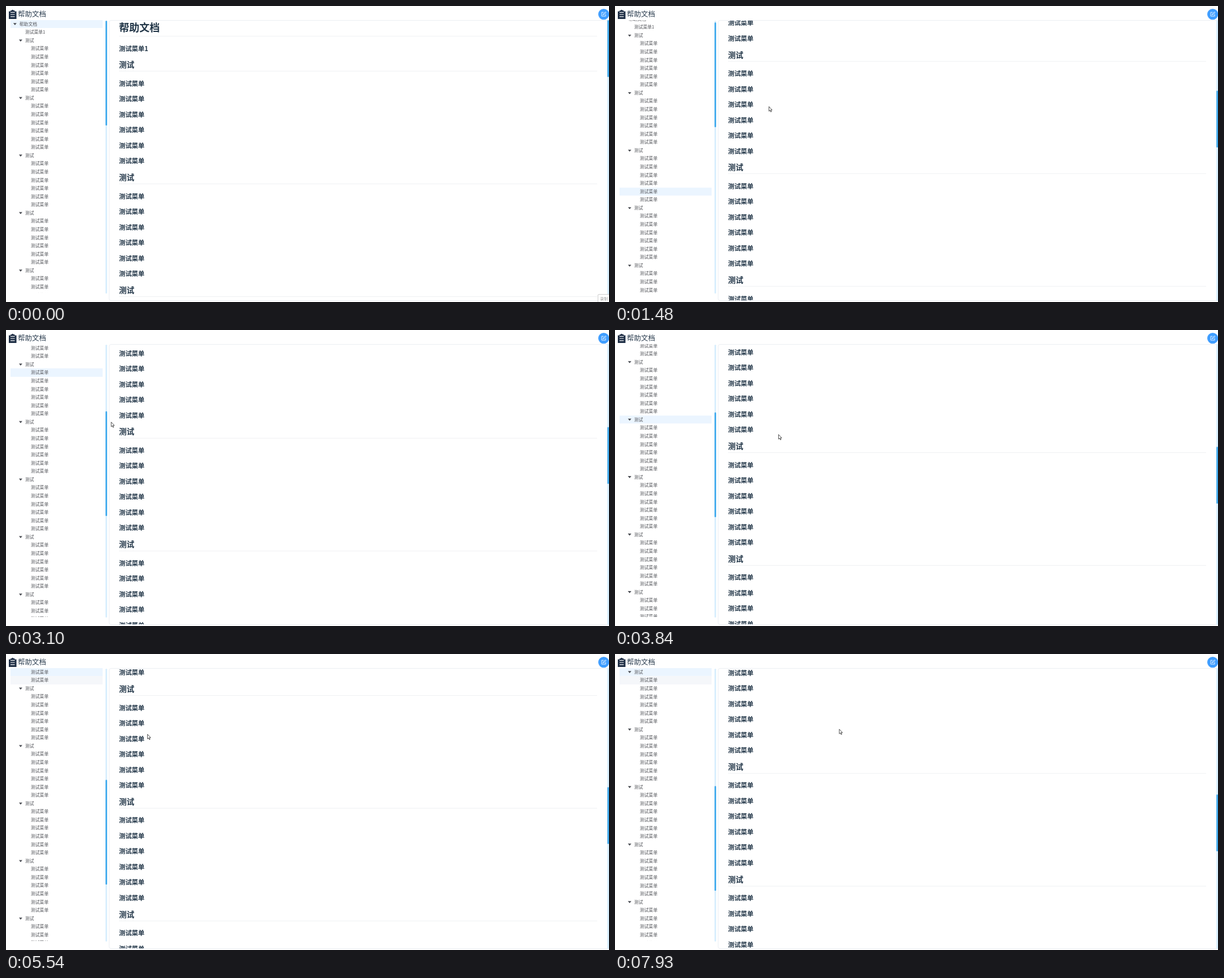
These frames come from a looping animation (1067 by 525 pixels, 8 s). An HTML page:

```html
<!DOCTYPE html>
<html>
<head>
<meta charset="utf-8">
<title>帮助文档</title>
<style>
  html, body { margin: 0; width: 1067px; height: 525px; overflow: hidden; background: #fff; }
  body { position: relative; font-family: "Noto Sans CJK SC", "Noto Sans CJK", "Noto Sans", sans-serif; }
  div, span, svg { position: absolute; white-space: nowrap; box-sizing: border-box; }
  .title { left: 21px; top: 4px; font-size: 12.5px; line-height: 20px; color: #2c3e50; }

  .tree { left: 0; top: 25px; width: 176px; height: 484px; overflow: hidden; }
  .row { left: 8px; width: 163px; height: 14.57px; line-height: 13.7px; font-size: 7.8px; color: #505257; }
  .row.focus { background: #f5f7fa; }
  .row.active { background: #ebf5ff; }
  .row i { position: absolute; top: 5.6px; width: 6px; height: 3.8px; background: #4b4e54;
           clip-path: polygon(0 0, 100% 0, 50% 100%); }

  .panel { left: 182px; top: 25px; width: 888px; height: 498px; border: 1px solid #ebeef3; border-radius: 4px; }
  .doc { left: 182px; top: 26px; width: 880px; height: 496px; overflow: hidden; }
  .head { left: 18px; width: 846px; height: 24px; line-height: 24px; font-weight: 700; color: #213547; }
  .h1 { font-size: 18px; margin-top: -1px; }
  .h2 { font-size: 13.5px; margin-top: -.6px; }
  .h3 { font-size: 11.25px; margin-top: -.5px; }
  .rule { left: 18px; width: 846px; height: 1px; background: #eff1f3; }

  .track { width: 3px; background: #d9effd; border-radius: 2px; }
  .thumb { left: 0; top: 0; width: 3px; background: #49aeee; border-radius: 2px; }
  .tag { left: 1047px; top: 511px; width: 24px; height: 18px; border: 1px solid #ccc; border-radius: 2px;
         background: #fff; font-size: 7px; line-height: 14px; padding-left: 3px; color: #999; }
  .ring { width: 13px; height: 13px; margin: -6.5px; border-radius: 50%; background: #fdf63c; opacity: .8; }
  #cursor { left: 0; top: 0; width: 16px; height: 16px; overflow: visible; }
</style>
</head>
<body>
<svg width="24" height="25" style="left:0;top:0">
  <path fill="#1f2f46" d="M5 9.5H8V8H10Q10.3 6.8 11.8 6.8T13.6 8H15.5V9.5H18.5V23H5Z"/>
  <path stroke="#fff" stroke-width="1.2" d="M8 11.3H15.5M8 15H15.5M8 18.8H15.5"/>
</svg>
<div class="title">帮助文档</div>
<svg width="20" height="25" style="left:1047px;top:0">
  <circle cx="10.6" cy="14.6" r="9.6" fill="#409eff"/>
  <path fill="none" stroke="#fff" stroke-width=".9" d="M10.5 11.2H7.2V18H14V14.6M9.6 15.6L10 14L13.6 10.4L14.8 11.6L11.2 15.2Z"/>
</svg>

<div class="tree"><div id="rows"></div></div>
<div class="track" style="left:176px;top:26px;height:484px"><div class="thumb" id="treeThumb" style="height:186px"></div></div>
<div class="panel"></div>
<div class="doc"><div id="heads"></div></div>
<div class="track" style="left:1064px;top:25px;height:498px"><div class="thumb" id="docThumb" style="height:101px"></div></div>
<div class="tag" id="tag">录制</div>
<div class="ring" id="ring"></div>
<svg id="cursor">
  <path id="arrow" fill="#fff" stroke="#222" stroke-width=".8" d="M.4 .4V8.6L2.3 6.9L3.6 9.9L4.9 9.3L3.6 6.4H6Z"/>
  <path id="beam" fill="none" stroke="#333" stroke-width=".8" d="M-2.2 -4.5H2.2M0 -4.5V4.5M-2.2 4.5H2.2"/>
  <path id="hand" fill="#fff" stroke="#222" stroke-width=".8" stroke-linejoin="round"
    d="M-1 1Q0 -.4 1 1V4.2Q2 3.6 2.7 4.6Q3.7 4.1 4.3 5Q5.4 4.8 5.5 6V8.5Q5.3 10 4.6 11.6H-.6Q-1.8 9.6 -3.4 7.4Q-3.6 5.8 -2 6.4L-1 7.4Z"/>
</svg>

<script>
const $ = id => document.getElementById(id);
const LOOP = 8000, ROW = 14.57, GROUP = 199.75, GROUPS = 12;

// Headings: y is the centre on the stage before scrolling.
const heads = [
  { level: 1, text: '帮助文档', y: 38 },
  { level: 3, text: '测试菜单1', y: 75, depth: 1 }
];
for (let g = 0; g < GROUPS; g++) {
  const y = 104 + g * GROUP;
  heads.push({ level: 2, text: '测试', y });
  for (let i = 0; i < 6; i++) heads.push({ level: 3, text: '测试菜单', y: y + 33.4 + i * 27.5 });
}
const rowOf = (g, i = -1) => 3 + g * 7 + i;
const scrollOf = row => row * ROW;

function add(parent, cls, top, text = '') {
  const el = document.createElement('div');
  el.className = cls;
  el.style.top = top + 'px';
  el.textContent = text;
  parent.append(el);
  return el;
}

const rows = heads.map((h, n) => {
  add($('heads'), 'head h' + h.level, h.y - 26 - 12, h.text);
  if (h.level < 3) add($('heads'), 'rule', h.y - 26 + (h.level === 1 ? 15 : 11.3));
  const depth = h.depth ?? h.level - 1;
  const row = add($('rows'), 'row', 32 - 25 - ROW / 2 + n * ROW, h.text);
  row.style.paddingLeft = 15.8 + depth * 10.1 + 'px';
  if (h.level < 3) {
    const arrow = document.createElement('i');
    arrow.style.left = 4.8 + depth * 10.1 + 'px';
    row.append(arrow);
  }
  return row;
});

const smooth = x => x * x * (3 - 2 * x);
const linear = x => x;

// Keys are [time, value]; values hold outside the keyed range.
function track(keys, t, ease, col = 1) {
  const n = keys.findIndex(k => k[0] > t);
  if (n === 0) return keys[0][col];
  if (n < 0) return keys[keys.length - 1][col];
  const a = keys[n - 1], b = keys[n];
  return a[col] + (b[col] - a[col]) * ease((t - a[0]) / (b[0] - a[0]));
}

const wheelKeys = [[300, 0], [1080, 336.5], [1150, 336.5], [1430, 617.3], [2800, 617.3], [3600, 897]];
const clickKeys = [[4740, 897], [5090, 1041], [6980, 1041], [7340, 1102.7]];
const treeKeys = [
  [1430, 0], [1935, scrollOf(rowOf(2, 4))],
  [3790, scrollOf(rowOf(2, 4))], [4260, scrollOf(rowOf(4))],
  [5220, scrollOf(rowOf(4))], [5540, scrollOf(rowOf(4, 4))],
  [7420, scrollOf(rowOf(4, 4))], [7720, scrollOf(rowOf(5))]
];
const mouseKeys = [
  [340, 262, 165], [1080, 272, 178], [1500, 272, 178], [1890, 229, 177], [1960, 205, 174],
  [2400, 27, 131], [2760, 60, 136], [3400, 289, 185], [3840, 289, 185], [4260, 31, 122],
  [4410, 31, 122], [4590, 61.5, 119], [5000, 61.5, 119], [5540, 250, 142], [6070, 376, 160],
  [6220, 376, 160], [6700, 76, 82], [7110, 76, 82], [7720, 493, 150], [7930, 396.5, 133]
];
const clicks = [4740, 6980];

function cursorKind(x, y, scroll) {
  if (x < 172) return 'hand';
  const overText = x > 200 && x < 245 && heads.some(h => Math.abs(h.y - scroll - y) < 7);
  return overText ? 'beam' : 'arrow';
}

function draw(t) {
  const doc = t < 4740 ? track(wheelKeys, t, linear) : track(clickKeys, t, smooth);
  const tree = track(treeKeys, t, smooth);
  $('heads').style.transform = `translateY(${-doc}px)`;
  $('rows').style.transform = `translateY(${-tree}px)`;
  $('docThumb').style.top = doc * 0.2028 + 'px';
  $('treeThumb').style.top = tree * 0.386 + 'px';

  const active = Math.max(0, heads.findLastIndex(h => h.y - doc <= 31.5));
  const focus = t < 4260 ? -1 : t < 6700 ? rowOf(4, 5) : rowOf(5, 0);
  rows.forEach((row, n) => {
    row.classList.toggle('active', n === active);
    row.classList.toggle('focus', n === focus);
  });

  const x = track(mouseKeys, t, smooth), y = track(mouseKeys, t, smooth, 2);
  const kind = cursorKind(x, y, doc);
  for (const id of ['arrow', 'beam', 'hand']) $(id).style.display = id === kind ? '' : 'none';
  $('cursor').style.display = t < 340 ? 'none' : '';
  $('cursor').style.transform = `translate(${x}px, ${y}px)`;

  $('ring').style.display = clicks.some(c => t >= c && t < c + 130) ? '' : 'none';
  $('ring').style.left = x - 1 + 'px';
  $('ring').style.top = y + 0.5 + 'px';
  $('tag').style.display = t < 70 ? '' : 'none';
}

const start = performance.now();
function frame() {
  draw((performance.now() - start) % LOOP);
  requestAnimationFrame(frame);
}
frame();
</script>
</body>
</html>
```
